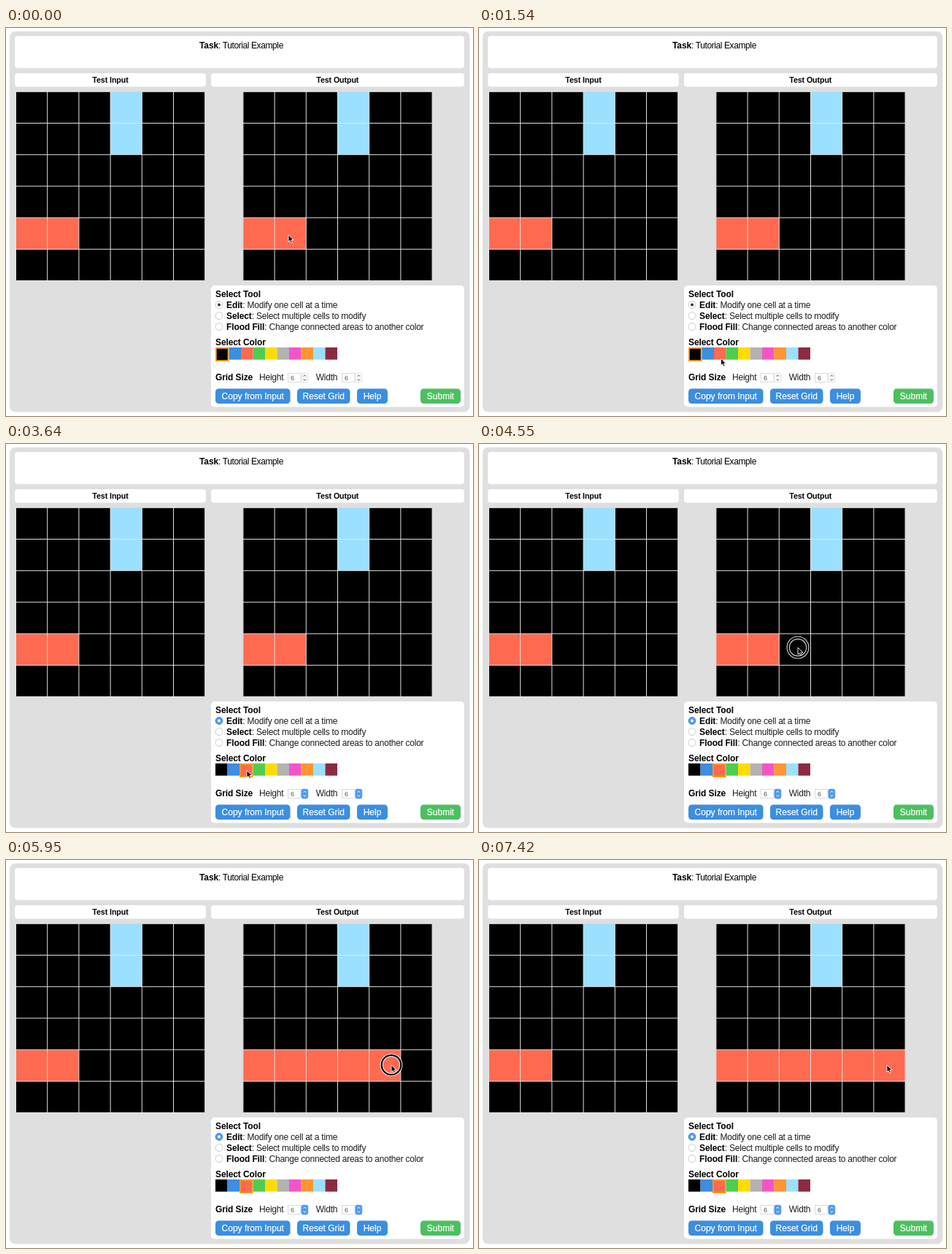
These frames come from a looping animation (640 by 532 pixels, 7.49 s). An HTML page:

```html
<!DOCTYPE html>
<html lang="en">
<head>
<meta charset="utf-8">
<title>Grid editor tutorial</title>
<style>
  html, body { margin: 0; width: 100%; height: 100%; overflow: hidden; background: #fff; }
  svg { display: block; width: 640px; height: 532px; }
  text { font: 12px "Liberation Sans", Arial, sans-serif; letter-spacing: -.23px; fill: #1c1c1c; white-space: pre; }
  .b { font-weight: 700; letter-spacing: -.1px; fill: #000; }
  .head { font-size: 10.7px; text-anchor: middle; }
  .task { letter-spacing: -.4px; }
  .btn text { fill: #fff; stroke: #fff; stroke-width: .2px; letter-spacing: 0; text-anchor: middle; }
  .num { font-size: 9px; fill: #555; }
  .panel { fill: #fff; }
  .lines { fill: none; stroke: #e2e2e2; stroke-width: 1; }
  .ring { fill: none; }
</style>
</head>
<body>
<svg id="stage" viewBox="0 0 640 532" xmlns="http://www.w3.org/2000/svg">
  <rect x="5" y="4.5" width="630.5" height="522" rx="8" fill="#dfdfdf"/>
  <g class="panel">
    <rect x="12" y="11" width="616" height="44" rx="4"/>
    <rect x="12" y="62" width="262" height="18.5" rx="4"/>
    <rect x="281" y="62" width="347" height="18.5" rx="4"/>
    <rect x="281" y="353" width="347" height="166.5" rx="5"/>
  </g>
  <text x="265" y="28" class="b">Task<tspan class="task" font-weight="400">: Tutorial Example</tspan></text>
  <text x="143" y="75.3" class="b head">Test Input</text>
  <text x="454.3" y="75.3" class="b head">Test Output</text>

  <g id="grids"></g>

  <text x="287" y="368.5" class="b">Select Tool</text>
  <g id="tools"></g>
  <text x="287" y="435" class="b">Select Color</text>
  <g id="palette"></g>

  <text x="287" y="482.5" class="b">Grid Size</text>
  <text x="347" y="482.5">Height</text>
  <text x="424.7" y="482.5">Width</text>
  <g id="steppers"></g>
  <g id="buttons" class="btn"></g>

  <g id="pointer">
    <g id="ring" class="ring">
      <circle r="13.3" stroke="#fff" stroke-opacity=".85" stroke-width="4.4"/>
      <circle r="13.3" stroke="#000" stroke-width="2.2"/>
    </g>
    <path d="M0 0V9.7L2.2 7.7L3.8 11.2L5.5 10.5L4 7H7Z" fill="#000" stroke="#fff" stroke-width=".9" stroke-linejoin="round"/>
  </g>
</svg>
<script>
const LOOP = 7490, TICK = 70;
const CELL = 43.2, TOP = 87.3, LEFT = 13.5, RIGHT = 324.9;
const CORAL = '#ff6a50', SKY = '#9be1ff', BLUE = '#3b8ee0';
const COLORS = ['#000', BLUE, CORAL, '#4fcc52', '#ffdc00', '#b3b3b3', '#f255c8', '#ff9530', SKY, '#8c2c40'];

const FOCUS = 2100, PICK = 3010, FILLS = [4620, 5250, 5880, 6510];
const CLICKS = [FOCUS, PICK, ...FILLS];

// Each move: start, end, x, y
const MOVES = [
  [0, 0, 387, 283.5],
  [210, 1330, 331.5, 453],
  [1610, 1960, 331, 450],
  [2520, 2870, 330, 447.5],
  [3710, 4480, 437, 279],
  [4620, 5040, 482, 280],
  [5320, 5740, 528, 281],
  [6020, 6370, 560, 281],
  [6650, 6930, 559, 281]
];

const byId = id => document.getElementById(id);

function add(parent, tag, attrs, text) {
  const el = document.createElementNS('http://www.w3.org/2000/svg', tag);
  set(el, attrs);
  if (text) el.textContent = text;
  return parent.appendChild(el);
}

function set(el, attrs) {
  for (const k in attrs) el.setAttribute(k, attrs[k]);
}

function cell(parent, x0, col, row, fill) {
  return add(parent, 'rect', { x: x0 + col * CELL, y: TOP + row * CELL, width: CELL, height: CELL, fill });
}

function grid(x0, extra) {
  const g = add(byId('grids'), 'g', {}), size = CELL * 6;
  add(g, 'rect', { x: x0, y: TOP, width: size, height: size });
  for (const row of [0, 1]) cell(g, x0, 3, row, SKY);
  for (const col of [0, 1]) cell(g, x0, col, 4, CORAL);
  const added = extra.map((_, i) => cell(g, x0, i + 2, 4, CORAL));
  let d = '';
  for (let i = 0; i <= 6; i++) {
    const p = i * CELL;
    d += `M${x0 + p} ${TOP}v${size}M${x0} ${TOP + p}h${size}`;
  }
  add(g, 'path', { d, class: 'lines' });
  return added;
}

grid(LEFT, []);
const filled = grid(RIGHT, FILLS);

const tools = [['Edit', 'Modify one cell at a time'], ['Select', 'Select multiple cells to modify'],
  ['Flood Fill', 'Change connected areas to another color']];
const radios = tools.map(([name, note], i) => {
  const y = 379.5 + i * 15;
  const label = add(byId('tools'), 'text', { x: 302, y: y + 4 });
  add(label, 'tspan', { class: 'b' }, name);
  add(label, 'tspan', {}, ': ' + note);
  return add(byId('tools'), 'circle', { cx: 292, cy: y, r: 5, fill: '#fff', stroke: '#bdbdbd', 'stroke-width': .8 });
});
const dot = add(byId('tools'), 'circle', { cx: 292, cy: 379.5, r: 2 });

const swatches = COLORS.map(fill => add(byId('palette'), 'rect', { fill, stroke: '#ff9a1f' }));

const steppers = [386.5, 460.5].map(x => {
  const g = byId('steppers');
  add(g, 'rect', { x, y: 473.5, width: 17.5, height: 12, fill: '#fff', stroke: '#d2d2d2', 'stroke-width': .8 });
  add(g, 'text', { x: x + 3.5, y: 482.7, class: 'num' }, '6');
  const box = add(g, 'rect', { x: x + 18.5, y: 473.3, width: 8.8, height: 12.6, rx: 2.5, 'stroke-width': .7 });
  const arrows = add(g, 'path', { d: `M${x + 21.2} 477.8l1.7-2l1.7 2m-3.4 3.6l1.7 2l1.7-2`, fill: 'none', 'stroke-width': 1 });
  return { box, arrows };
});

[['Copy from Input', 287, 102.5, BLUE], ['Reset Grid', 399, 72.5, BLUE],
  ['Help', 481, 42, BLUE], ['Submit', 568, 55, '#4cc060']].forEach(([name, x, width, fill]) => {
  add(byId('buttons'), 'rect', { x, y: 494.5, width, height: 20.5, rx: 4.5, fill });
  add(byId('buttons'), 'text', { x: x + width / 2, y: 509 }, name);
});

function choose(index) {
  let x = 287;
  swatches.forEach((s, i) => {
    const on = i === index, w = on ? 18.5 : 16.5, edge = on ? .9 : 0;
    set(s, { x: x + edge, y: 438 + edge, width: w - 2 * edge, height: (on ? 19 : 16.7) - 2 * edge, 'stroke-width': on ? 1.8 : 0 });
    x += w;
  });
}

function focusWindow(on) {
  set(radios[0], { fill: on ? '#4b9cf3' : '#fff', stroke: on ? '#3c88dc' : '#bdbdbd' });
  set(dot, { fill: on ? '#fff' : '#333' });
  for (const { box, arrows } of steppers) {
    set(box, { fill: on ? '#4b9cf3' : '#fff', stroke: on ? '#3c88dc' : '#d2d2d2' });
    set(arrows, { stroke: on ? '#fff' : '#555' });
  }
}

function position(t) {
  let [, , x, y] = MOVES[0];
  for (const [start, end, tx, ty] of MOVES.slice(1)) {
    if (t <= start) break;
    const p = Math.min(1, (t - start) / (end - start));
    const k = p * p * (3 - 2 * p);
    x += (tx - x) * k;
    y += (ty - y) * k;
  }
  return [x, y];
}

function render(t) {
  focusWindow(t >= FOCUS);
  choose(t >= PICK ? 2 : 0);
  filled.forEach((c, i) => set(c, { visibility: t >= FILLS[i] ? 'visible' : 'hidden' }));
  const pressed = CLICKS.some(c => t >= c - 140 && t < c + 140);
  set(byId('ring'), { visibility: pressed ? 'visible' : 'hidden' });
  set(byId('pointer'), { transform: `translate(${position(t)})` });
}

const began = performance.now();
function loop(now) {
  const t = Math.max(0, now - began) % LOOP;
  render(Math.floor(t / TICK) * TICK);
  requestAnimationFrame(loop);
}
render(0);
requestAnimationFrame(loop);
</script>
</body>
</html>
```
